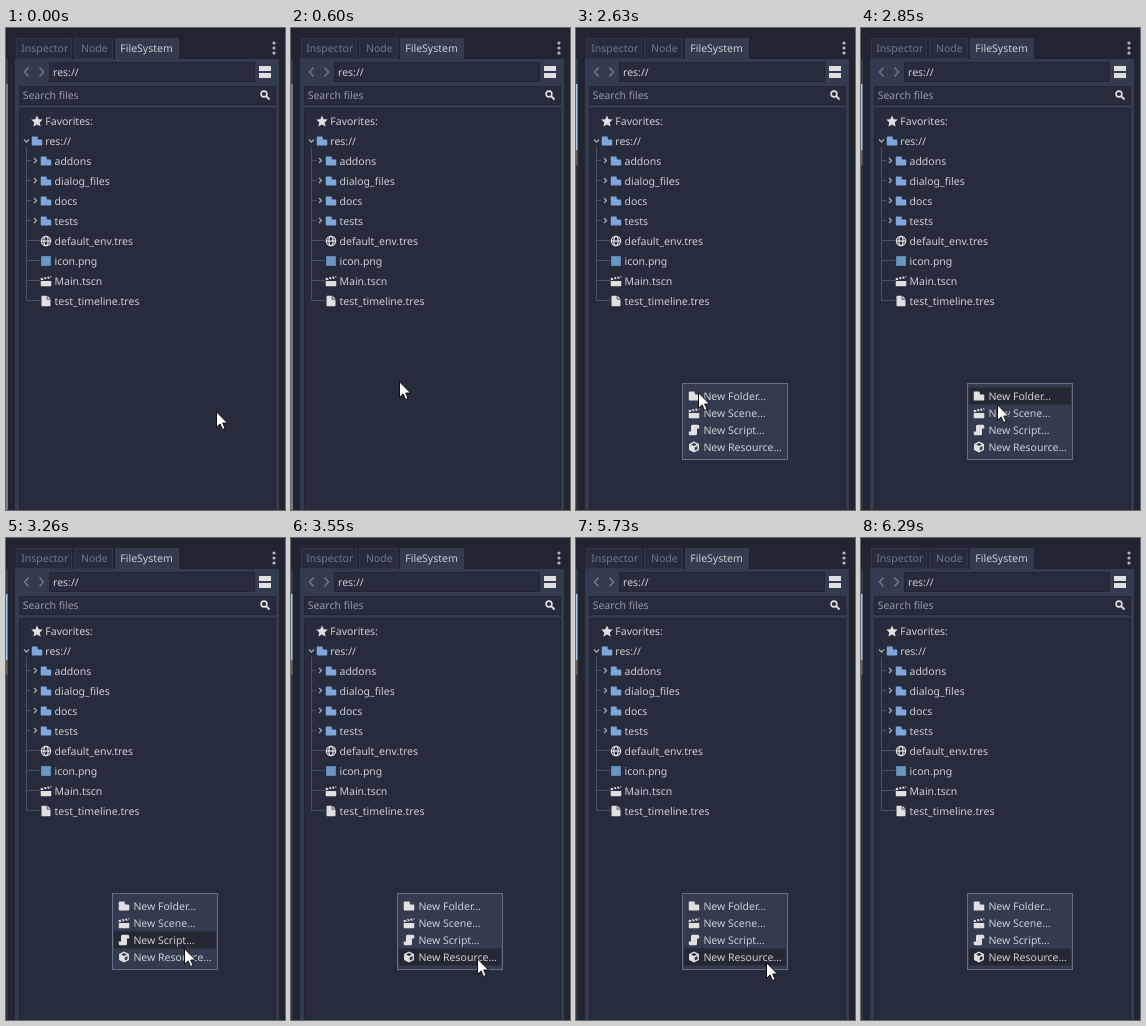
An HTML page for the animation above (7120 ms loop, 279 by 482 pixels).

```html
<!DOCTYPE html>
<html lang="en">
<head>
<meta charset="utf-8">
<title>File dock</title>
<style>
  html, body { margin: 0; width: 100%; height: 100%; overflow: hidden; background: #202531; }
  svg { display: block; width: 279px; height: 482px; }
  text { font: 10.5px "Noto Sans", "Open Sans", sans-serif; fill: #cdcfd2; text-rendering: geometricPrecision; }
  .dim { fill: #717888; }
  .soft { fill: #9499a4; }
  .line { fill: none; stroke: #4a5161; }
  .arrow { fill: none; stroke: #a3a8b2; stroke-width: 1.3; }
</style>
</head>
<body>
<svg viewBox="0 0 279 482">
  <defs>
    <path id="folder" d="M2 2a1 1 0 0 0-1 1v10a1 1 0 0 0 1 1h12a1 1 0 0 0 1-1V7a1 1 0 0 0-1-1h-4a1 1 0 0 1-1-1V3a1 1 0 0 0-1-1z"/>
    <g id="scene">
      <path d="M1 8h14v6a1 1 0 0 1-1 1H2a1 1 0 0 1-1-1z"/>
      <path d="M1 4l2.2-.4 1.6 2.6L1 7zM5 3.2l2.4-.4 1.6 2.6-2.4.4zM9.200 2.500l2.400-.4 1.600 2.600-2.400.4zM13.300 1.700l1.500-.3.400 3z"/>
    </g>
    <path id="file" d="M2 2a1 1 0 0 1 1-1h6v5h5v8a1 1 0 0 1-1 1H3a1 1 0 0 1-1-1zM10 1l4 4h-4z"/>
    <path id="script" d="M6 1a2 2 0 0 0-2 2v7H1v3a2 2 0 0 0 2 2h7a2 2 0 0 0 2-2V6h3V3a2 2 0 0 0-2-2z"/>
    <path id="cube" fill-rule="evenodd" d="M8 .6L14.600 4v8L8 15.400 1.400 12V4zM8 2.800L4.200 4.800 8 6.700l3.800-1.900zM9 8.500v4.300l3.700-1.900V6.600z"/>
    <g id="globe" fill="none" stroke="#e0e0e0" stroke-width="1.7">
      <circle cx="8" cy="8" r="6.2"/>
      <ellipse cx="8" cy="8" rx="2.8" ry="6.2"/>
      <path d="M2 8h12"/>
    </g>
    <rect id="picture" x="1.500" y="1.500" width="13" height="13" fill="#6797c2"/>
  </defs>

  <!-- neighbouring view -->
  <rect y="31" width="2" height="451" fill="#333b4f"/>
  <rect id="edge" y="56" width="2" height="426" fill="#747b89"/>
  <g id="view">
    <rect y="56" width="1.500" height="66" fill="#a3c9e6"/>
    <rect y="122" width="1.500" height="15" fill="#6b6251"/>
    <rect y="137" width="1.500" height="345" fill="#2f333b"/>
  </g>

  <!-- dock -->
  <rect x="9" y="31" width="264" height="451" fill="#333b4f"/>
  <g fill="#262c3b" stroke="#303748">
    <rect x="10.500" y="10.500" width="55" height="20"/>
    <rect x="68.500" y="10.500" width="38" height="20"/>
  </g>
  <rect x="109" y="10" width="64" height="22" fill="#333b4f"/>
  <text x="15.300" y="24" class="dim">Inspector</text>
  <text x="75" y="24" class="dim">Node</text>
  <text x="114.300" y="24">FileSystem</text>
  <g fill="#b5b8be">
    <circle cx="268" cy="15" r="1.600"/><circle cx="268" cy="20" r="1.600"/><circle cx="268" cy="25" r="1.600"/>
  </g>
  <path d="M22.500 39.500L18.500 44l4 4.500M33.500 39.500l4 4.500-4 4.500" fill="none" stroke="#727a8b" stroke-width="1.400"/>
  <g fill="#262c3b" stroke="#202531">
    <rect x="43.500" y="34.500" width="205" height="19"/>
    <rect x="13.500" y="58.500" width="256" height="18"/>
    <rect id="tree" x="13.500" y="80.500" width="256" height="420"/>
  </g>
  <text x="47" y="48">res://</text>
  <path d="M253 38h12v5h-12zM253 45h12v5h-12z" fill="#e0e0e0"/>
  <text x="16.700" y="71" class="soft">Search files</text>
  <circle cx="258" cy="66" r="2.900" fill="none" stroke="#e0e0e0" stroke-width="1.600"/>
  <path d="M260.200 68.200l3.300 3.300" stroke="#e0e0e0" stroke-width="1.800"/>

  <g id="rows">
    <path d="M31 87.500l1.700 3.700 4 .4-3 2.800.9 4.100-3.600-2.100-3.600 2.100.9-4.100-3-2.800 4-.4z" fill="#e0e0e0"/>
    <text x="39.300" y="97">Favorites:</text>
    <path class="arrow" d="M18 111.500l2.500 2.500 2.500-2.500"/>
    <use href="#folder" transform="translate(25 107) scale(.75)" fill="#7fa6dc"/>
    <text x="39.300" y="117">res://</text>
    <path class="line" d="M20.500 119V273"/>
  </g>

  <g id="menu">
    <rect x="106.500" y="355.500" width="105" height="76" fill="#333b4f" stroke="#667088"/>
    <rect id="hover" x="108" width="102" height="17" fill="#232834"/>
  </g>

  <path id="cursor" d="M.5.8V16.300L4.100 12.900 6.600 18.500 9.100 17.400 6.700 12H11.500z" fill="#fff" stroke="#000" stroke-width=".9"/>
  <circle id="click" r="12" fill="#b40f18" fill-opacity=".72"/>
</svg>

<script>
const LOOP = 7120;
const el = id => document.getElementById(id);

function add(parent, tag, attrs, text) {
  const node = document.createElementNS("http://www.w3.org/2000/svg", tag);
  for (const key in attrs) node.setAttribute(key, attrs[key]);
  if (text) node.textContent = text;
  parent.append(node);
}

function addItem(parent, icon, label, x, y, gap, fill = "#e0e0e0") {
  add(parent, "use", { href: "#" + icon, fill, transform: `translate(${x} ${y - 6}) scale(.75)` });
  add(parent, "text", { x: x + gap, y: y + 4 }, label);
}

[
  ["folder", "addons"], ["folder", "dialog_files"], ["folder", "docs"], ["folder", "tests"],
  ["globe", "default_env.tres"], ["picture", "icon.png"], ["scene", "Main.tscn"], ["file", "test_timeline.tres"]
].forEach(([icon, label], i) => {
  const y = 133 + i * 20, isFolder = icon === "folder", rows = el("rows");
  add(rows, "path", { class: "line", d: `M20.5 ${y - .5}H${isFolder ? 25 : 34}` });
  if (isFolder) add(rows, "path", { class: "arrow", d: `M28 ${y - 3}l2.5 2.500-2.500 2.500` });
  addItem(rows, icon, label, 34, y, 14.5, isFolder ? "#7fa6dc" : undefined);
});

[
  ["folder", "New Folder..."], ["scene", "New Scene..."], ["script", "New Script..."], ["cube", "New Resource..."]
].forEach(([icon, label], i) => addItem(el("menu"), icon, label, 112, 368 + i * 17, 15.4));

// Pointer steps: [time, x, y]
const glide = (t0, dt, n, from, to, ease = p => p) =>
  Array.from({ length: n }, (_, i) => {
    const p = ease((i + 1) / n);
    return [t0 + i * dt, ...from.map((v, k) => Math.round(v + (to[k] - v) * p))];
  });

const path = [
  [0, 210, 383],
  ...glide(70, 66, 4, [210, 383], [108, 351], p => 1 - (1 - p) ** 1.7),
  [600, 108, 353], [670, 106, 354], [950, 106, 355],
  [2630, 122, 364],
  ...glide(2708, 78, 8, [122, 364], [178, 410]).slice(0, 7),
  [3260, 178, 410], [3330, 183, 416],
  [3410, 184, 417], [3480, 185, 419], [3550, 186, 420],
  ...glide(5730, 70, 9, [186, 420], [250, 490], p => p ** 1.3)
];

const within = (t, a, b) => t >= a && t < b;
const show = (node, on) => node.setAttribute("visibility", on ? "visible" : "hidden");

const edge = el("edge"), view = el("view"), tree = el("tree"), menu = el("menu");
const hover = el("hover"), cursor = el("cursor"), click = el("click");

function draw(t) {
  const [, x, y] = path.findLast(step => step[0] <= t + 2);
  cursor.setAttribute("transform", `translate(${x} ${y})`);
  click.setAttribute("transform", `translate(${x} ${y})`);
  show(click, within(t, 670, 760) || within(t, 1830, 1900) || within(t, 4210, 4340));

  show(edge, t < 670);
  show(view, t >= 670);
  tree.setAttribute("stroke", within(t, 670, 1900) ? "#8f98aa" : "#202531");

  const item = Math.min(3, Math.floor((y - 359.5) / 17));
  hover.setAttribute("y", 359.5 + item * 17);
  show(menu, t >= 1900);
  show(hover, t >= 2706);
}

const start = performance.now();
function tick() {
  draw((performance.now() - start) % LOOP);
  requestAnimationFrame(tick);
}
tick();
</script>
</body>
</html>
```
